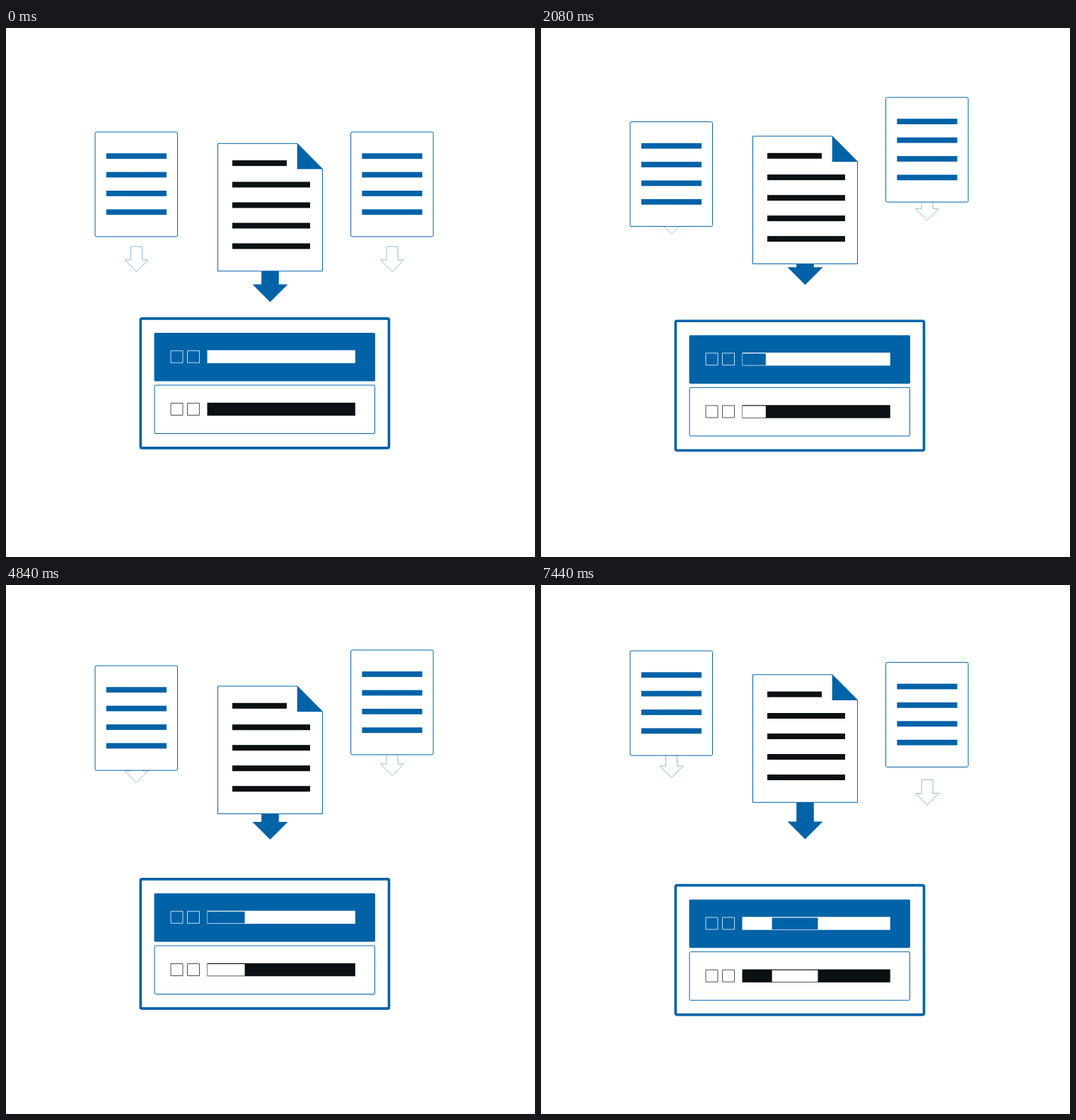
Write an HTML page with a canvas that moves like this. It is 748x748 px and loops after 7480 ms.

```html
<!DOCTYPE html>
<html lang="en">
<head>
<meta charset="utf-8">
<title>Documents into storage</title>
<style>
html, body { margin: 0; width: 100%; height: 100%; overflow: hidden; background: #fff; }
canvas { display: block; width: 748px; height: 748px; }
</style>
</head>
<body>
<canvas id="stage" width="748" height="748"></canvas>
<script>
const ctx = document.getElementById('stage').getContext('2d');
const BLUE = '#0062a7', INK = '#0b1014', WHITE = '#fff', PALE = '#8dbbd9';
const LOOP = 7480, CYCLE = 2860, STEP = 40, LAG = 200;

// Key points as [time, value], joined by a sine ease
const SIDE_DOC = [[0, 0], [530, -55], [1093, 0], [1782, -55], [2235, 0]];
const SIDE_ARROW = [[0, 0], [535, -75], [1109, 48], [1788, -75], [2600, 0]];
const MAIN_DOC = [[0, 0], [430, -38], [1220, 7], [1720, -36.5], [2280, 0]];
const MAIN_ARROW = [[0, 0], [480, -60], [1103, 30.5], [1800, -30], [2780, 0]];
const STORE = [[0, 0], [1080, 33], [2160, 3]];
const LAMPS = [[0, 0], [680, 1], [1040, 0]];

const part = (t, a, b) => Math.min(1, Math.max(0, (t - a) / (b - a)));

function track(keys, t) {
  if (t <= keys[0][0]) return keys[0][1];
  for (let i = 1; i < keys.length; i++) {
    const [a, from] = keys[i - 1], [b, to] = keys[i];
    if (t < b) return from + (to - from) * (1 - Math.cos(Math.PI * part(t, a, b))) / 2;
  }
  return keys[keys.length - 1][1];
}

function fill(color, x, y, w, h) {
  ctx.fillStyle = color;
  ctx.fillRect(x, y, w, h);
}

function frame(color, x, y, w, h, width = 1) {
  ctx.strokeStyle = color;
  ctx.lineWidth = width;
  ctx.strokeRect(x, y, w, h);
}

function panel(x, y, w, h, r, paint, line, width) {
  ctx.beginPath();
  ctx.roundRect(x, y, w, h, r);
  ctx.fillStyle = paint;
  ctx.fill();
  ctx.strokeStyle = line;
  ctx.lineWidth = width;
  ctx.stroke();
}

// Arrow pointing down, hung from its tip
function arrow(x, tip, shaft, head, headHeight, height) {
  const neck = tip - headHeight;
  ctx.beginPath();
  ctx.moveTo(x - shaft, tip - height);
  ctx.lineTo(x + shaft, tip - height);
  ctx.lineTo(x + shaft, neck);
  ctx.lineTo(x + head, neck);
  ctx.lineTo(x, tip);
  ctx.lineTo(x - head, neck);
  ctx.lineTo(x - shaft, neck);
  ctx.closePath();
}

function sideDoc(x, t) {
  arrow(x + 58.5, 344.5 + track(SIDE_ARROW, t), 8, 16.5, 16.5, 35.5);
  ctx.strokeStyle = PALE;
  ctx.lineWidth = 1;
  ctx.stroke();

  const y = 147 + track(SIDE_DOC, t);
  panel(x, y, 116.5, 148, 2, WHITE, BLUE, 1);
  for (let i = 0; i < 4; i++) fill(BLUE, x + 15.8, y + 30.2 + i * 26.4, 85.2, 7.8);
}

function mainDoc(t) {
  arrow(373.5, 387.5 + track(MAIN_ARROW, t), 12.3, 25, 25, 54.5);
  ctx.fillStyle = BLUE;
  ctx.fill();

  const y = 163.3 + track(MAIN_DOC, t);
  ctx.beginPath();
  ctx.moveTo(299.5, y);
  ctx.lineTo(412, y);
  ctx.lineTo(447.5, y + 36);
  ctx.lineTo(447.5, y + 180.5);
  ctx.lineTo(299.5, y + 180.5);
  ctx.closePath();
  ctx.fillStyle = WHITE;
  ctx.fill();
  ctx.strokeStyle = BLUE;
  ctx.lineWidth = 1;
  ctx.lineJoin = 'round';
  ctx.stroke();

  ctx.beginPath();
  ctx.moveTo(411.7, y);
  ctx.lineTo(448, y + 36.3);
  ctx.lineTo(411.7, y + 36.3);
  ctx.fillStyle = BLUE;
  ctx.fill();

  fill(INK, 320, y + 23.8, 77, 8);
  for (let i = 0; i < 4; i++) fill(INK, 320, y + 54.2 + i * 29, 110, 8);
}

// Gap in the bar: opens to the right, then closes to the left
function gap(t) {
  if (t < 1315) {
    return [part(t, 890, 1305), 1 - (1 - part(t, 740, 1308)) ** 2];
  }
  return [1 - part(t, 1320, 1820), 1 - part(t, 1320, 2250) ** 0.85];
}

function row(y, color, back, line, t) {
  const lit = track(LAMPS, t);
  for (const x of [233, 256.5]) {
    ctx.globalAlpha = lit;
    fill(color, x, y, 17, 17);
    ctx.globalAlpha = 1;
    frame(line, x, y, 17, 17);
  }
  fill(color, 284.5, y - 0.7, 209.3, 18.4);
  const [a, b] = gap(t);
  if (b > a) fill(back, 285 + 208 * a, y + 0.5, 208 * (b - a), 16.5);
}

function store(t) {
  const y = track(STORE, t);
  panel(190.3, 410.9 + y, 351.2, 183, 2, WHITE, BLUE, 3.6);
  panel(210, 431.5 + y, 311.5, 67.5, 1, BLUE, BLUE, 1);
  panel(210, 505 + y, 311.5, 68.5, 1.5, WHITE, BLUE, 1);
  row(456.3 + y, WHITE, BLUE, '#c4dcec', t);
  row(530.5 + y, INK, WHITE, '#4a4d50', t);
}

function draw(time) {
  const t = time % CYCLE;
  fill(WHITE, 0, 0, 748, 748);
  sideDoc(126, t);
  sideDoc(487.6, t - LAG);
  mainDoc(t);
  store(t);
}

const start = performance.now();
function tick() {
  const time = (performance.now() - start) % LOOP;
  draw(Math.floor(time / STEP) * STEP);
  requestAnimationFrame(tick);
}
tick();
</script>
</body>
</html>
```
